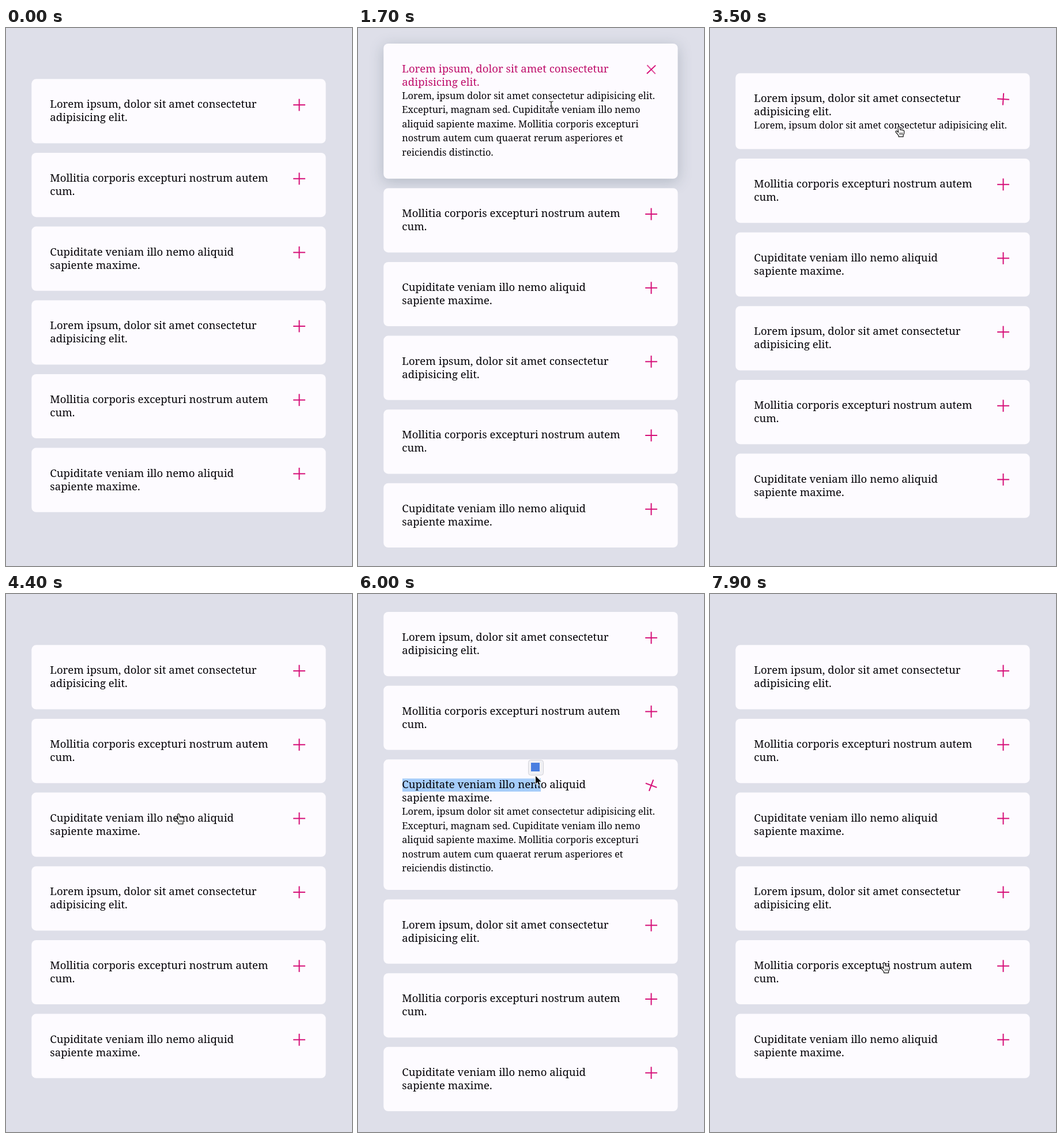
These frames come from a looping animation (600x931 px, 8 s). An HTML page with a canvas:

```html
<!DOCTYPE html>
<html lang="en">
<head>
<meta charset="utf-8">
<title>Accordion</title>
<style>
html, body { margin: 0; width: 100%; height: 100%; overflow: hidden; background: #dedfe9; }
canvas { display: block; }
</style>
</head>
<body>
<canvas id="stage" width="600" height="931"></canvas>
<script>
const ctx = document.getElementById('stage').getContext('2d');
const LOOP = 8000;
const CARD = { x: 44.3, top: 88.3, w: 510.2, h: 111.2, pitch: 127.65, radius: 8 };
const BODY_H = 122.6, MAX_H = 500;
const PINK = [214, 15, 120];
const INK = [5, 3, 8];

const titles = [
  ['Lorem ipsum, dolor sit amet consectetur', 'adipisicing elit.'],
  ['Mollitia corporis excepturi nostrum autem', 'cum.'],
  ['Cupiditate veniam illo nemo aliquid', 'sapiente maxime.']
];
const bodyLines = [
  'Lorem, ipsum dolor sit amet consectetur adipisicing elit.',
  'Excepturi, magnam sed. Cupiditate veniam illo nemo',
  'aliquid sapiente maxime. Mollitia corporis excepturi',
  'nostrum autem cum quaerat rerum asperiores et',
  'reiciendis distinctio.'
];
// Card index -> [open, close] click times
const clicks = { 0: [1520, 3052], 2: [4520, 5719] };
const SELECT = [5720, 7000];
const POPUP = [5900, 7000];

// [time, x, y, shape]; the shape holds until the next key
const cursorKeys = [
  [700, 352, 150, 'hand'], [1050, 336, 130, 'hand'], [1540, 335, 133, 'beam'],
  [2450, 335, 133, 'beam'], [2700, 340, 100, 'hand'], [2950, 341, 72, 'hand'],
  [3250, 341, 72, 'hand'], [3700, 318, 240, 'hand'], [4150, 298, 381, 'hand'],
  [4560, 300, 380, 'hand'], [4950, 309, 325, 'hand'], [5720, 309, 325, 'hand'],
  [5900, 308, 315, 'arrow'], [6900, 308, 315, 'hand'], [7250, 298, 633, 'hand'],
  [7620, 298, 633, 'hand'], [7850, 302, 638, 'hand'], [8000, 302, 638, 'hand']
];

const clamp = v => Math.max(0, Math.min(1, v));
const mix = (a, b, k) => a + (b - a) * k;
const within = (t, [a, b]) => t >= a && t < b;
const rgb = (a, b = a, k = 0) => `rgb(${a.map((v, i) => Math.round(mix(v, b[i], k))).join()})`;

// CSS "ease": cubic-bezier(.25, .1, .25, 1)
function ease(x) {
  x = clamp(x);
  const curve = (s, a, b) => 3 * s * (1 - s) ** 2 * a + 3 * s * s * (1 - s) * b + s ** 3;
  let lo = 0, hi = 1;
  for (let i = 0; i < 22; i++) {
    const mid = (lo + hi) / 2;
    if (curve(mid, .25, .25) < x) lo = mid; else hi = mid;
  }
  return curve(lo, .1, 1);
}

function openness(i, t, duration) {
  const c = clicks[i];
  if (!c) return 0;
  return t < c[1] ? ease((t - c[0]) / duration) : 1 - ease((t - c[1]) / duration);
}

function roundRect(x, y, w, h, r) {
  ctx.beginPath();
  ctx.roundRect(x, y, w, h, r);
}

function drawIcon(x, y, p) {
  ctx.save();
  ctx.translate(x, y);
  ctx.rotate(p * Math.PI / 2);
  ctx.fillStyle = rgb(PINK);
  ctx.fillRect(-1, -10.4, 2, 20.8);
  ctx.globalAlpha = 1 - p * p;
  ctx.fillRect(-10.4, -1, 20.8, 2);
  ctx.restore();
}

function drawCard(i, y, t) {
  const p = openness(i, t, 600);
  const tint = openness(i, t, 300);
  const shown = Math.min(BODY_H, MAX_H * p);

  ctx.save();
  ctx.shadowColor = `rgba(60, 82, 98, ${.3 * tint})`;
  ctx.shadowBlur = 24;
  ctx.shadowOffsetY = 5;
  ctx.fillStyle = '#fdfbff';
  roundRect(CARD.x, y, CARD.w, CARD.h + shown, CARD.radius);
  ctx.fill();
  ctx.restore();

  if (i === 2 && within(t, SELECT)) {
    ctx.fillStyle = '#a6cdfa';
    ctx.fillRect(77, y + 33, 240, 22.6);
  }
  ctx.fillStyle = rgb(INK, PINK, tint);
  ctx.font = '500 18.6px "Noto Serif", serif';
  titles[i % 3].forEach((line, n) => ctx.fillText(line, 76.3, y + 50 + n * 23));

  if (shown > 0) {
    ctx.save();
    ctx.beginPath();
    ctx.rect(CARD.x, y + 79, CARD.w, shown);
    ctx.clip();
    ctx.fillStyle = rgb(INK);
    ctx.font = '16.4px "Noto Serif", serif';
    bodyLines.forEach((line, n) => ctx.fillText(line, 76.3, y + 95.7 + n * 24.5));
    ctx.restore();
  }
  drawIcon(508.5, y + 44.8, p);
  return shown;
}

function drawPopup() {
  ctx.fillStyle = '#f0f0f4';
  ctx.strokeStyle = '#d2d2d8';
  ctx.lineWidth = 1;
  roundRect(295.5, 287.5, 26, 26, 4);
  ctx.fill();
  ctx.stroke();
  ctx.fillStyle = '#4a7fe0';
  ctx.fillRect(300, 292, 15, 15);
}

const shapes = {
  hand() {
    const p = new Path2D('M-1.6 1Q0-1.2 1.4 1L2.4 6Q4 4.6 5 6.2Q6.6 5 7.4 6.8Q9.2 6.2 9.2 8.4L9 12L7.6 15V17.6H-.4V15.8L-3.4 12L-5.6 9.4Q-5.6 7.2-3.4 7.8L-1 10Z');
    ctx.fillStyle = '#fff';
    ctx.strokeStyle = '#111';
    ctx.lineWidth = 1.2;
    ctx.lineJoin = 'round';
    ctx.fill(p);
    ctx.stroke(p);
    ctx.lineWidth = .9;
    ctx.stroke(new Path2D('M1.6 10.5V14.5M3.8 10.5V14.5M6 10.5V14.5'));
  },
  beam() {
    const p = new Path2D('M-3.5-6Q0-6 0-4Q0-6 3.5-6M0-4V5M-3.5 7Q0 7 0 5Q0 7 3.5 7M-2 2H2');
    ctx.strokeStyle = '#fff';
    ctx.lineWidth = 2.6;
    ctx.stroke(p);
    ctx.strokeStyle = '#111';
    ctx.lineWidth = 1.2;
    ctx.stroke(p);
  },
  arrow() {
    const p = new Path2D('M0 0V13.5L3.2 10.6L5.3 15.5L7.6 14.5L5.5 9.8H9.8Z');
    ctx.lineJoin = 'round';
    ctx.strokeStyle = '#fff';
    ctx.lineWidth = 1.8;
    ctx.stroke(p);
    ctx.fillStyle = '#0a0a0a';
    ctx.fill(p);
  }
};

function drawCursor(t) {
  const n = cursorKeys.findIndex(k => k[0] > t);
  if (n < 1) return;
  const [t0, x0, y0, shape] = cursorKeys[n - 1];
  const [t1, x1, y1] = cursorKeys[n];
  const s = (t - t0) / (t1 - t0);
  const k = s * s * (3 - 2 * s);
  ctx.save();
  ctx.translate(mix(x0, x1, k), mix(y0, y1, k));
  shapes[shape]();
  ctx.restore();
}

function draw(t) {
  ctx.fillStyle = '#dedfe9';
  ctx.fillRect(0, 0, 600, 931);
  let extra = 0;
  for (const i in clicks) extra += Math.min(BODY_H, MAX_H * openness(i, t, 600));
  let y = CARD.top - extra / 2;
  for (let i = 0; i < 6; i++) y += CARD.pitch + drawCard(i, y, t);
  if (within(t, POPUP)) drawPopup();
  drawCursor(t);
}

const start = performance.now();
function tick() {
  draw((performance.now() - start) % LOOP);
  requestAnimationFrame(tick);
}
tick();
</script>
</body>
</html>
```
